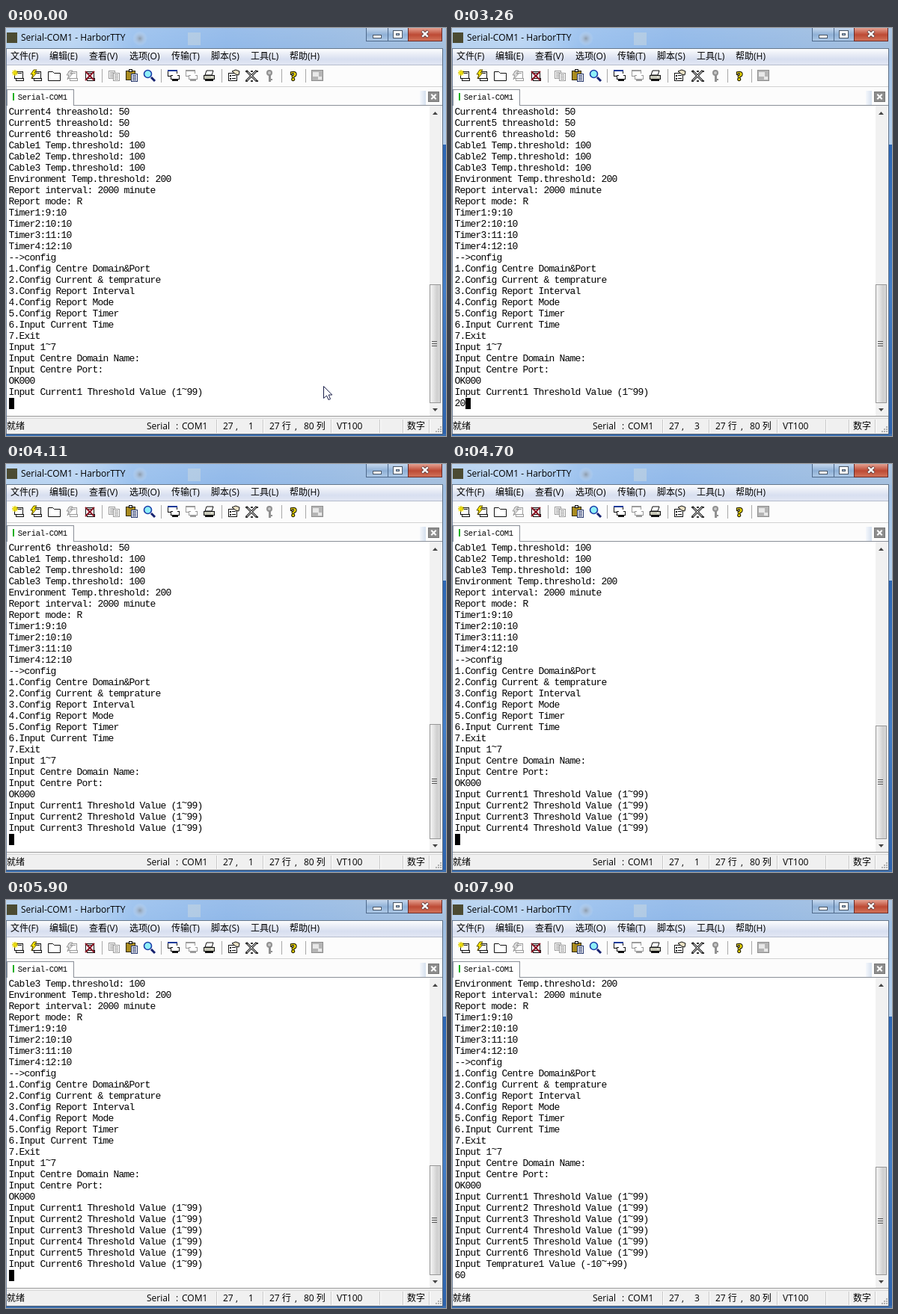
These frames come from a looping animation (588x546 px, 8000 ms). An HTML page with a canvas:

```html
<!DOCTYPE html>
<html lang="zh-CN">
<head>
<meta charset="utf-8">
<title>Serial terminal</title>
<style>
html, body { margin: 0; width: 588px; height: 546px; overflow: hidden; }
canvas { display: block; }
</style>
</head>
<body>
<canvas id="stage" width="588" height="546"></canvas>
<script>
const ctx = document.getElementById('stage').getContext('2d');
const UI = '12px "Open Sans", "Noto Sans CJK SC", "Noto Sans CJK", sans-serif';
const MONO = '"Liberation Mono", "DejaVu Sans Mono", monospace';
const LOOP = 8000, ROWS = 27, ROW_H = 15, COL_W = 7, LEFT = 4, TOP = 105;

const count = (a, b, fn) => Array.from({ length: b - a + 1 }, (_, i) => fn(a + i));
const lines = [
  ...count(4, 6, n => `Current${n} threashold: 50`),
  ...count(1, 3, n => `Cable${n} Temp.threshold: 100`),
  'Environment Temp.threshold: 200',
  'Report interval: 2000 minute',
  'Report mode: R',
  ...count(1, 4, n => `Timer${n}:${n + 8}:10`),
  '-->config',
  '1.Config Centre Domain&Port',
  '2.Config Current & temprature',
  '3.Config Report Interval',
  '4.Config Report Mode',
  '5.Config Report Timer',
  '6.Input Current Time',
  '7.Exit',
  'Input 1~7',
  'Input Centre Domain Name:',
  'Input Centre Port:',
  'OK000',
  ...count(1, 6, n => `Input Current${n} Threshold Value (1~99)`),
  'Input Temprature1 Value (-10~+99)'
];

// time, lines scrolled, typed text, status column, caret visible
const steps = [
  [0, 0, '', 1, 1], [690, 0, '', 1, 0], [1270, 0, '', 1, 1], [1770, 0, '', 1, 0],
  [2230, 0, '', 1, 1], [2750, 0, '', 1, 0], [2870, 0, '2', 1, 1], [2990, 0, '2', 2, 1],
  [3140, 0, '20', 2, 1], [3260, 0, '20', 3, 1],
  [3410, 1, '', 1, 1], [3680, 1, '2', 2, 1], [3830, 1, '20', 3, 1],
  [4110, 2, '', 1, 1], [4240, 2, '2', 2, 1], [4390, 2, '20', 2, 1], [4540, 2, '20', 3, 1],
  [4700, 3, '', 1, 1], [4850, 3, '2', 2, 1], [5000, 3, '20', 2, 1], [5120, 3, '20', 3, 1],
  [5270, 4, '', 1, 1], [5510, 4, '2', 2, 1], [5630, 4, '20', 3, 1],
  [5780, 5, '', 3, 1], [5900, 5, '', 1, 1], [6170, 5, '2', 1, 1], [6320, 5, '2', 2, 1],
  [6470, 5, '20', 3, 1],
  [6600, 6, '', 1, 1], [6860, 6, '', 1, 0], [7420, 6, '', 1, 1], [7540, 6, '6', 1, 1],
  [7660, 6, '6', 2, 1], [7780, 6, '60', 3, 1], [7900, 6, '60', 3, 0]
];
const MOUSE_HIDES = 2870;

function rect(x, y, w, h, fill) {
  ctx.fillStyle = fill;
  ctx.fillRect(x, y, w, h);
}
function frame(x, y, w, h, fill, line) {
  rect(x, y, w, h, line);
  rect(x + 1, y + 1, w - 2, h - 2, fill);
}
function poly(pts, fill, line, width = 1) {
  ctx.beginPath();
  for (let i = 0; i < pts.length; i += 2) ctx.lineTo(pts[i], pts[i + 1]);
  if (fill) {
    ctx.closePath();
    ctx.fillStyle = fill;
    ctx.fill();
  }
  if (line) {
    ctx.strokeStyle = line;
    ctx.lineWidth = width;
    ctx.stroke();
  }
}
function cross(x, y, r, color, width) {
  poly([x - r, y - r, x + r, y + r], null, color, width);
  poly([x + r, y - r, x - r, y + r], null, color, width);
}
function ring(x, y, r, fill, line, width = 1) {
  ctx.beginPath();
  ctx.arc(x, y, r, 0, 7);
  ctx.fillStyle = fill;
  ctx.fill();
  ctx.strokeStyle = line;
  ctx.lineWidth = width;
  ctx.stroke();
}
function ramp(x0, y0, x1, y1, ...colors) {
  const g = ctx.createLinearGradient(x0, y0, x1, y1);
  colors.forEach((c, i) => g.addColorStop(i / (colors.length - 1), c));
  return g;
}
function glow(x, y, r, color) {
  const g = ctx.createRadialGradient(x, y, 0, x, y, r);
  g.addColorStop(0, color);
  g.addColorStop(1, 'rgba(255,255,255,0)');
  rect(x - r, y - r, 2 * r, 2 * r, g);
}
function label(s, x, y, color = '#000') {
  ctx.font = UI;
  ctx.fillStyle = color;
  ctx.fillText(s, x, y);
}
function grid(s, x, y, step, size) {
  ctx.font = size + 'px ' + MONO;
  ctx.fillStyle = '#000';
  const inset = (step - size * 0.6) / 2;
  [...s].forEach((c, i) => ctx.fillText(c, x + i * step + inset, c === '~' ? y - 4 : y));
}

function titleBar() {
  rect(0, 0, 588, 28, ramp(0, 0, 588, 0, '#b4d0ee', '#98c0ee', '#8bb5e8', '#94b8e2', '#a0bcdc'));
  rect(0, 0, 588, 28, ramp(0, 0, 0, 28, 'rgba(255,255,255,.12)', 'rgba(255,255,255,.05)'));
  glow(90, 13, 80, 'rgba(235,244,255,.3)');
  glow(179, 14, 10, 'rgba(125,125,125,.6)');
  rect(243, 6, 17, 17, 'rgba(200,215,225,.55)');
  rect(1, 6, 14, 14, '#4b4b32');
  label('Serial-COM1 - HarborTTY', 20, 17);

  const line = '#4f6a8c';
  const glass = ramp(0, 0, 0, 18, '#c5d8ee', '#8fb0d6', '#b0cbe8');
  frame(481, -1, 30, 19, glass, line);
  frame(510, -1, 28, 19, glass, line);
  frame(537, -1, 46, 19, ramp(0, 0, 0, 18, '#e5a191', '#bd4a35', '#d4775d'), '#6b2b28');
  frame(490, 9, 12, 5, '#fff', '#4a5666');
  frame(517, 3, 13, 11, '#fff', '#4a5666');
  frame(521, 7, 5, 3, '#a8c2e0', '#4a5666');
  cross(560, 8, 4, '#5b3a3a', 4.5);
  cross(560, 8, 3.7, '#fff', 2.6);
}

function menuBar() {
  rect(0, 27, 584, 1, '#66788c');
  rect(0, 28, 584, 21, ramp(0, 28, 0, 49, '#fcfdfe', '#e9edf6', '#d8dff0', '#e2e7f4'));
  rect(0, 49, 584, 1, '#b6bccc');
  const xs = [6, 58, 111, 165, 221, 274, 327, 379];
  ['文件(F)', '编辑(E)', '查看(V)', '选项(O)', '传输(T)', '脚本(S)', '工具(L)', '帮助(H)']
    .forEach((s, i) => label(s, xs[i], 42));
}

function monitor(x, y, ink) {
  frame(x, y, 12, 10, '#fff', ink);
  rect(x + 2, y + 2, 8, 1, ink);
  frame(x + 2, y + 9, 11, 4, '#fff', ink);
}
function spark(x, y) {
  poly([x, y - 4, x, y + 4], null, '#d9c400', 1.5);
  poly([x - 4, y, x + 4, y], null, '#d9c400', 1.5);
  cross(x, y, 3, '#f3e400', 1.5);
}
function bolt(x, y, fill, line) {
  poly([x + 4, y, x, y + 6, x + 3, y + 6, x + 1, y + 12, x + 8, y + 4, x + 5, y + 4, x + 8, y], fill, line);
}
function page(x, y, ink) {
  frame(x, y, 9, 11, '#fff', ink);
  for (let i = 2; i < 9; i += 2) rect(x + 2, y + i, 5, 1, ink);
}
function printer(x, y, ink, body) {
  poly([x + 4, y, x + 13, y, x + 11, y + 6, x + 2, y + 6], '#fff', ink);
  frame(x, y + 6, 15, 6, body, ink);
  rect(x + 2, y + 12, 11, 2, ink);
  rect(x + 10, y + 8, 2, 1, '#fff');
}
function printScreen(x, ink, bar) {
  frame(x, 56, 13, 9, '#fff', ink);
  rect(x, 56, 13, 2, bar);
  frame(x + 4, 63, 12, 6, '#fff', ink);
  rect(x + 6, 69, 8, 2, ink);
  rect(x + 7, 61, 6, 3, '#fff');
}

function toolBar() {
  const ink = '#111', dim = '#9a9a9a';
  rect(0, 50, 584, 29, '#fcfcfc');
  rect(0, 78, 584, 1, '#d2d2d2');
  [128, 207, 288, 368, 400].forEach(x => rect(x, 55, 1, 18, '#a8a8a8'));

  monitor(11, 58, ink);
  spark(12, 60);
  monitor(35, 58, ink);
  bolt(33, 56, '#ffe800', '#5c5200');
  poly([56.5, 58.5, 62.5, 58.5, 64.5, 60.5, 72.5, 60.5, 72.5, 70.5, 56.5, 70.5], '#fff', ink);
  monitor(83, 58, dim);
  bolt(81, 57, '#ddd', dim);
  monitor(106, 58, ink);
  cross(112, 64, 6, '#8c1224', 2);

  page(137, 57, dim);
  page(143, 60, dim);
  frame(160, 57, 13, 13, '#a98b20', '#2e2708');
  frame(164, 55, 5, 4, '#d8d8d8', ink);
  page(167, 61, '#23346a');
  poly([194, 66, 199, 71], null, '#14206e', 3);
  ring(189.5, 61.5, 5, '#8ff0f8', '#1b3ca8', 1.6);

  printScreen(216, ink, '#1c3a98');
  printScreen(240, dim, dim);
  printer(264, 57, ink, '#c9c9b9');

  frame(297, 60, 12, 11, '#fff', ink);
  rect(299, 63, 2, 2, ink);
  rect(302, 63, 5, 1, ink);
  rect(299, 67, 2, 2, ink);
  rect(302, 67, 5, 1, ink);
  poly([302, 58, 307, 56, 312, 58, 311, 63, 307, 62], '#e9e0c4', ink);
  cross(328, 64, 7, '#333', 3);
  cross(328, 64, 6, '#ddd', 1);
  [321, 328, 335].forEach(x => rect(x - 1, 57, 3, 2, '#333'));
  [321, 328, 335].forEach(x => rect(x - 1, 70, 3, 2, '#333'));
  ring(352, 60, 3, '#c8c8c8', '#909090', 2);
  rect(351, 63, 3, 9, '#909090');
  rect(354, 68, 2, 2, '#909090');

  ctx.font = 'bold 17px "Liberation Serif", serif';
  ctx.lineWidth = 2.4;
  ctx.strokeStyle = '#2b2600';
  ctx.strokeText('?', 380, 70);
  ctx.fillStyle = '#f5e100';
  ctx.fillText('?', 380, 70);

  frame(408, 56, 16, 15, '#b5b5b5', '#8e8e8e');
  rect(410, 59, 8, 6, '#e8e8e8');
  rect(417, 65, 5, 4, '#e8e8e8');
}

function tabs() {
  rect(0, 79, 584, 25, '#fcfcfc');
  rect(553, 84, 8, 19, ramp(553, 0, 561, 0, '#f5f8fc', '#d5e0ee'));
  rect(0, 103, 584, 1, '#8a8f98');
  frame(1, 82, 90, 22, '#fff', '#8a8f98');
  rect(2, 103, 88, 1, '#fff');
  rect(9, 87, 2, 10, '#1cb01c');
  grid('Serial-COM1', 16, 96, 6, 10.5);
  frame(564, 85, 15, 14, '#8d8d8d', '#777');
  cross(571.5, 92, 3.2, '#fff', 2);
}

function scrollBar(n) {
  rect(566, 104, 16, 416, '#f1f1f1');
  poly([570, 116, 573.5, 112, 577, 116], '#444');
  poly([570, 509, 573.5, 513, 577, 509], '#444');
  const y = Math.round(343 + n * 2.4), h = 502 - y;
  frame(566, y, 15, h, ramp(566, 0, 581, 0, '#f6f6f6', '#e6e6e6', '#cfcfcf', '#dcdcdc'), '#979797');
  const mid = Math.round(y + h / 2) - 4;
  for (let i = 0; i < 3; i++) rect(569, mid + i * 3, 7, 1, '#555');
}

function statusBar(col) {
  rect(0, 519, 584, 1, '#9a9a9a');
  rect(0, 520, 584, 23, '#f0f0f0');
  rect(0, 522, 584, 1, '#d9d9d9');
  [281, 343, 434, 499, 530, 565].forEach(x => {
    rect(x, 524, 1, 18, '#c8c8c8');
    rect(x + 1, 524, 1, 18, '#fff');
  });
  label('就绪', 1, 537);
  label('Serial', 188, 537);
  label(':', 227, 537);
  label('COM1', 235, 537);
  label('27', 290, 537);
  label(',', 307, 537);
  label(col, 324, 537);
  label('27 行', 352, 537);
  label(',', 386, 537);
  label('80 列', 398, 537);
  label('VT100', 442, 537);
  label('数字', 536, 537);
  for (let r = 0; r < 3; r++)
    for (let c = 0; c <= r; c++) rect(580 - c * 3, 533 + r * 3, 2, 2, '#b0b0b0');
}

function edges() {
  rect(0, 28, 1, 515, '#6f8098');
  rect(583, 28, 1, 515, '#5f7085');
  rect(584, 28, 4, 128, ramp(0, 28, 0, 156, '#9dbde2', '#b4cfec'));
  rect(584, 156, 4, 390, ramp(0, 156, 0, 546, '#2c66b4', '#447fc8', '#2c62ac'));
  rect(0, 543, 588, 3, '#3c6fb0');
  rect(0, 543, 584, 1, '#4a5a70');
}

function terminal(scroll, typed, caret) {
  rect(0, 104, 566, 415, '#fff');
  lines.slice(scroll, scroll + ROWS - 1).concat(typed)
    .forEach((s, i) => grid(s, LEFT, TOP + i * ROW_H + 11, COL_W, 13));
  if (caret) rect(LEFT + typed.length * COL_W, TOP + (ROWS - 1) * ROW_H, COL_W, ROW_H, '#000');
}

function pointer(x, y) {
  poly([0, 0, 0, 16, 4, 12.5, 6.5, 18, 9, 17, 6.7, 11.5, 11.3, 11.5, 0, 0]
    .map((v, i) => v + (i % 2 ? y : x) + 0.5), '#fff', '#1a1f4a');
}

function draw([time, scroll, typed, col, caret]) {
  titleBar();
  menuBar();
  toolBar();
  tabs();
  terminal(scroll, typed, caret);
  scrollBar(scroll);
  statusBar(col);
  edges();
  if (time < MOUSE_HIDES) pointer(424, 479);
}

const start = performance.now();
let shown = null;
function tick(now) {
  const t = Math.max(0, now - start) % LOOP;
  const step = steps.findLast(s => s[0] <= t);
  if (step !== shown) draw(shown = step);
  requestAnimationFrame(tick);
}
tick(start);
</script>
</body>
</html>
```
